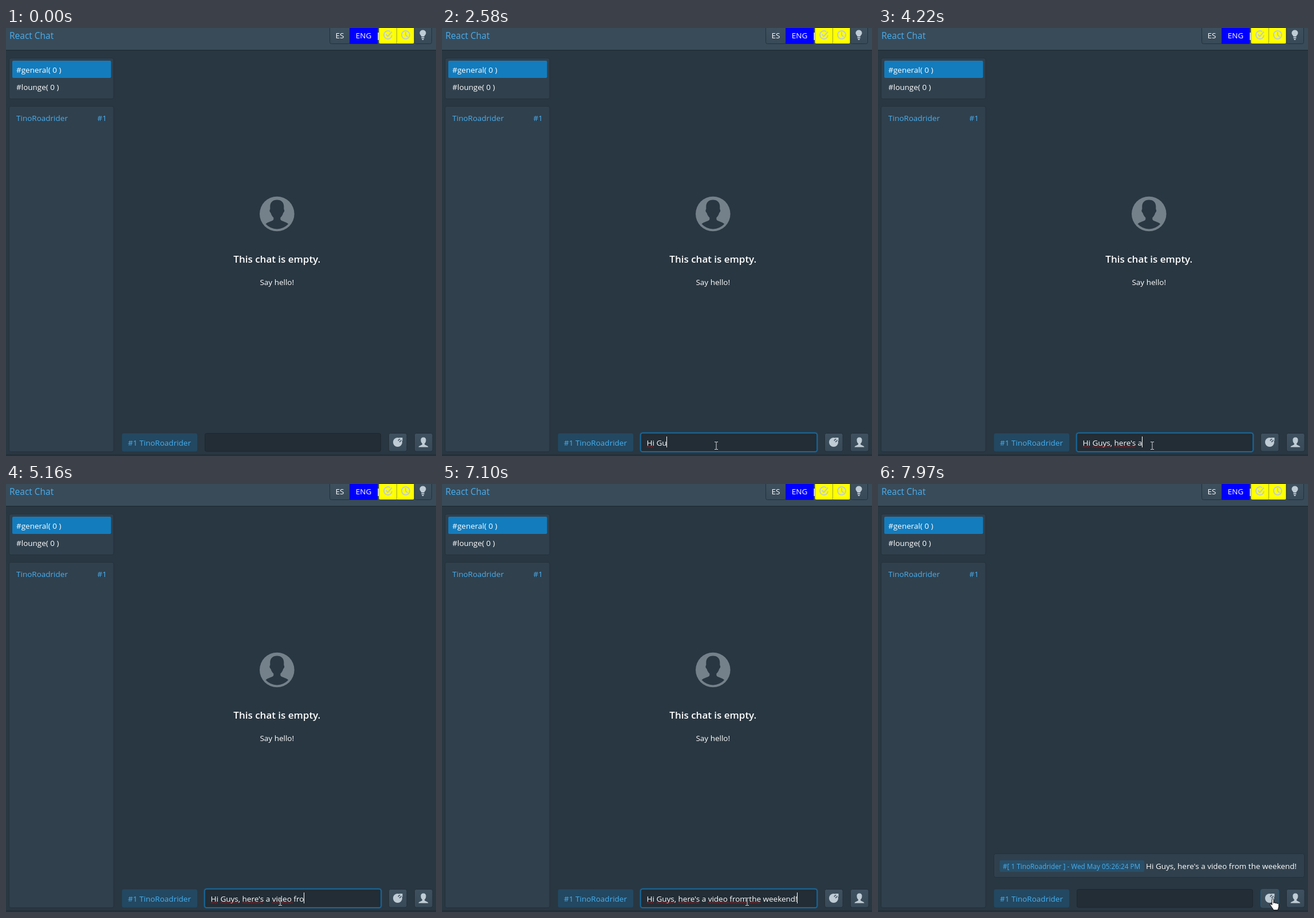
An HTML page that plays this animation: 751x746 px, repeating every 8 s.

```html
<!DOCTYPE html>
<html lang="en">
<head>
<meta charset="utf-8">
<title>React Chat</title>
<style>
  html, body { margin: 0; width: 100%; height: 100%; overflow: hidden; background: #293742; }
  svg { display: block; }
  text { font: 13.5px "Open Sans", "Noto Sans", sans-serif; fill: #fff; white-space: pre; }
  .link { fill: #48aff0; }
  .mid { text-anchor: middle; }
  .card { fill: #30404d; stroke: #222e37; stroke-opacity: .75; }
  .tag { fill: #137cbd; fill-opacity: .25; }
  .button { fill: url(#face); stroke: #24303a; }
  .icon { fill: #bfccd6; }
  .line { fill: none; stroke: #bfccd6; stroke-width: 2; }
  .cursor { fill: #fff; stroke: #000; stroke-linejoin: round; }
</style>
</head>
<body>
<svg width="751" height="746" viewBox="0 0 751 746">
  <defs>
    <linearGradient id="face" x2="0" y2="1">
      <stop stop-color="#3f515f"/><stop offset="1" stop-color="#384a57"/>
    </linearGradient>
    <path id="out" d="M686 720.500l5-5M687 715h4.500v4.500"/>
    <path id="stem" d="M-3-6.500h2.500l.500.500.500-.500h2.500M0-6v12M-3 6.500h2.500l.500-.500.500.500h2.500"/>
  </defs>
  <rect width="751" height="746" fill="#293742"/>
  <rect y="743" width="751" height="3" fill="#23303a"/>

  <!-- Header -->
  <rect width="751" height="38" fill="#394b59"/>
  <rect y="38" width="751" height="1" fill="#202b34"/>
  <rect y="39" width="751" height="1" fill="#25323c"/>
  <text class="link" x="6" y="19" style="font-size:15.5px">React Chat</text>
  <rect class="button" x="565.5" y="-6.5" width="35" height="34" rx="3"/>
  <rect x="600.5" y="-4.5" width="48.5" height="32" fill="#00f" stroke="#10161a" stroke-opacity=".4"/>
  <rect x="649.5" y="8" width="1.5" height="13" fill="#f5f8fa"/>
  <rect x="651.5" y="-4" width="61" height="31" rx="2" fill="#ff0"/>
  <rect x="682" width="1" height="27" fill="#9ca52c"/>
  <rect class="button" x="713.5" y="-6.5" width="30" height="34" rx="3"/>
  <text class="mid" x="583" y="18">ES</text>
  <text class="mid" x="624.5" y="18">ENG</text>
  <path class="line" d="M671 6.300A7 7 0 1 0 674 12.500M663.500 11l3.500 3.500 7-8"/>
  <path class="line" d="M705 12a7 7 0 1 1-14 0a7 7 0 1 1 14 0M698 7v5l3.500 3.500"/>
  <path class="icon" d="M725.500 15c0-2-3-3-3-6.500a5.500 5 0 0 1 11 0c0 3.500-3 4.500-3 6.500zM725.500 16h5v2h-5zM726 19h4l-1 2h-2z"/>

  <!-- Side panels -->
  <rect class="card" x="5.500" y="52.500" width="182.500" height="71" rx="3"/>
  <rect x="11" y="57" width="172.500" height="30" rx="2" fill="#137cbd"/>
  <text x="18" y="78">#general( 0 )</text>
  <text x="18" y="108">#lounge( 0 )</text>
  <rect class="card" x="5.500" y="136.500" width="182.500" height="602" rx="3"/>
  <text class="link" x="18" y="162">TinoRoadrider</text>
  <text class="link" x="176" y="162" text-anchor="end">#1</text>

  <!-- Chat area -->
  <g id="empty">
    <circle cx="473.300" cy="324" r="30.300" fill="#74818b"/>
    <path fill="#293742" d="M473.300 299.500c-7.500 0-12 4.500-12 11.500v5c-1.500 1-1 5 1 6 1 4 3 6.500 5 8.500v3c-1 3.500-10 4-13.800 8a26.500 26.500 0 0 0 39.600 0c-3.800-4-12.800-4.500-13.800-8v-3c2-2 4-4.500 5-8.500 2-1 2.500-5 1-6v-5c0-7-4.500-11.500-12-11.500z"/>
    <text class="mid" x="473.300" y="409" style="font-size:17px;font-weight:600">This chat is empty.</text>
    <text class="mid" x="473.300" y="448">Say hello!</text>
  </g>
  <g id="message">
    <rect class="card" x="202.500" y="644.500" width="542" height="41" rx="3"/>
    <rect class="tag" x="212.500" y="656" width="252.500" height="20" rx="2"/>
    <text class="link" x="218" y="671" style="font-size:11.75px">#[ 1 TinoRoadrider ] - Wed May 05:26:24 PM</text>
    <text x="468" y="671">Hi Guys, here's a video from the weekend!</text>
  </g>

  <!-- Composer -->
  <rect class="tag" x="202.500" y="706.500" width="131.500" height="31.500" rx="3"/>
  <text class="link mid" x="268" y="728">#1 TinoRoadrider</text>
  <rect x="347.500" y="706.500" width="307" height="31.500" rx="3" fill="#222d35" stroke="#1c262e"/>
  <g id="glow" fill="none" stroke="#137cbd">
    <rect x="346.500" y="705.500" width="309" height="33" rx="4" stroke-width="3" opacity=".3"/>
    <rect x="347" y="706" width="308" height="32.500" rx="3"/>
  </g>
  <text id="typed" x="357.500" y="728"></text>
  <path id="squiggle" fill="none" stroke="#c41e24" stroke-width=".8"/>
  <rect id="caret" y="712" width="1" height="19" fill="#fff"/>
  <rect id="send" class="button" x="668.500" y="706.500" width="31.500" height="31.500" rx="3"/>
  <circle class="icon" cx="684" cy="722" r="8"/>
  <use href="#out" fill="none" stroke="#3b4d5b" stroke-width="5"/>
  <use href="#out" class="line"/>
  <rect class="button" x="713.500" y="706.500" width="31.500" height="31.500" rx="3"/>
  <path class="icon" d="M729 713.500c-3 0-4.800 2-4.500 5 0 3 1 4.500 2.500 6v1c-1 2-6 2-6.500 5h17c-.500-3-5.500-3-6.500-5v-1c1.500-1.500 2.500-3 2.500-6 .300-3-1.500-5-4.500-5z"/>

  <!-- Pointers, each with its hot spot at 0,0 -->
  <g id="beam" fill="none">
    <use href="#stem" stroke="#161d22" stroke-width="2"/>
    <use href="#stem" stroke="#e4e8eb"/>
  </g>
  <path id="arrow" class="cursor" d="M0 0v16l4-3.500 2.500 6 2.500-1-2.500-6h5z"/>
  <path id="hand" class="cursor" d="M-1.500 1.500c0-2 3-2 3 0v6c.500-1.500 3-1.500 3 .500.500-1.500 3-1.200 3 .700.500-1.300 3-1 3 1v4c0 2-1.500 3-1.500 6h-8c0-2-2-3.500-3.500-6l-2-3c-.700-1.500 1-2.500 2.200-1.200l.800 1.200z"/>
</svg>
<script>
const LOOP = 8000;
const SENTENCE = "Hi Guys, here's a video from the weekend! ";
const MISSPELT = /\b\w[\w']+(?=[,!]? )/g;

// Runs of key presses: start time, time per key, characters reached
const RUNS = [
  [2110, 0, 1], [2270, 80, 3], [2500, 80, 5], [2740, 160, 7], [3440, 70, 9],
  [3670, 80, 13], [4070, 0, 15], [4220, 0, 17], [4300, 0, 18], [4450, 80, 25],
  [5080, 80, 27], [5310, 80, 34], [5940, 80, 36], [6170, 0, 37],
  [6320, 80, 40], [6790, 0, 41], [7580, 0, 42]
];
const CARET_ON = [[780, 1330], [1800, 7340], [7580, 7890]];
// Time, shape, x, y
const POINTER = [
  [0, ""], [140, "arrow", 655, 727], [220, "beam", 540, 724], [300, "beam", 479, 725],
  [460, "beam", 479, 727], [540, "beam", 479, 730], [1410, "beam", 479, 728],
  [7100, "beam", 533, 728], [7180, ""], [7660, "arrow", 695, 730], [7740, "hand", 689.5, 723]
];

const $ = id => document.getElementById(id);
const show = (id, on) => { $(id).style.display = on ? "" : "none"; };

function typedCount(t) {
  let count = 0;
  for (const [start, gap, end] of RUNS) {
    if (t < start) break;
    count = gap ? Math.min(end, count + 1 + Math.floor((t - start) / gap)) : end;
  }
  return count;
}

function drawInput(t) {
  const field = $("typed");
  const value = t < 7970 ? SENTENCE.slice(0, typedCount(t)) : "";
  if (field.textContent !== value) field.textContent = value;
  const xAfter = n => 357.5 + (n ? field.getSubStringLength(0, n) : 0);

  let waves = "";
  for (const { 0: word, index } of value.matchAll(MISSPELT)) {
    const left = xAfter(index), right = xAfter(index + word.length);
    waves += `M${left} 730.5` + "l2-1.5 2 1.5".repeat(Math.round((right - left) / 4));
  }
  $("squiggle").setAttribute("d", waves);
  $("caret").setAttribute("x", Math.floor(xAfter(value.length)));
  show("caret", CARET_ON.some(([on, off]) => t >= on && t < off));
}

function drawPointer(t) {
  const [, shape, x, y] = POINTER.findLast(step => t >= step[0]);
  for (const id of ["beam", "arrow", "hand"]) show(id, id === shape);
  if (shape) $(shape).setAttribute("transform", `translate(${x} ${y})`);
}

function draw() {
  const t = performance.now() % LOOP;
  const sent = t >= 7970;
  show("empty", !sent);
  show("message", sent);
  $("glow").style.opacity = t < 780 || sent ? 0 : t < 860 || t >= 7890 ? 0.5 : 1;
  $("send").style.stroke = t >= 7890 ? "#2b5a78" : "";
  drawInput(t);
  drawPointer(t);
  requestAnimationFrame(draw);
}
draw();
</script>
</body>
</html>
```
